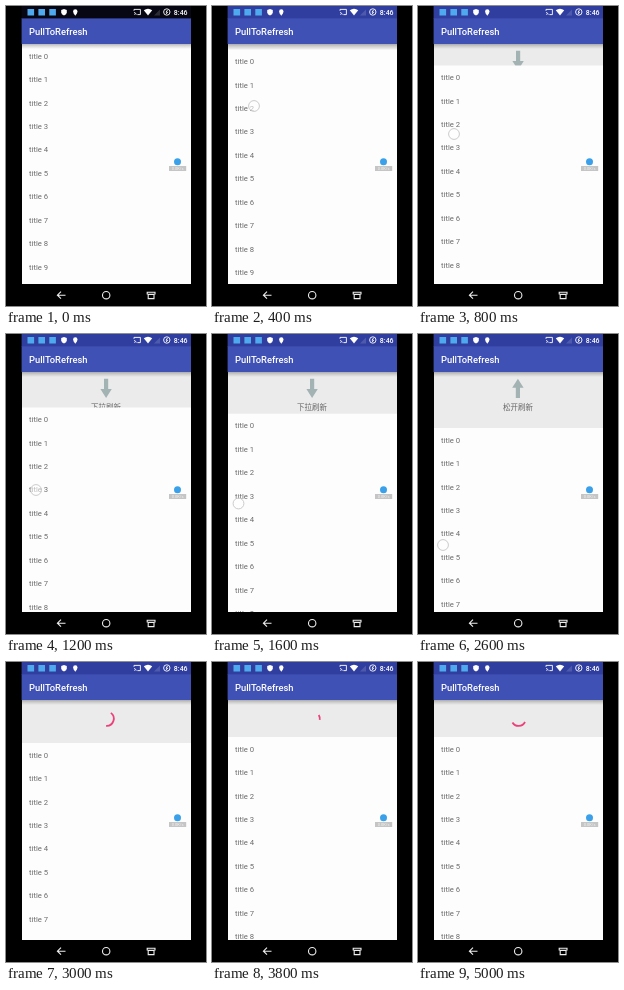
Animation, 200 px wide and 300 px high, one loop 5.2 s. Source, as an HTML page:

```html
<!DOCTYPE html>
<html lang="en">
<head>
<meta charset="utf-8">
<title>Pull to refresh</title>
<style>
  html, body { margin: 0; width: 100%; height: 100%; overflow: hidden; background: #000; }
  svg { display: block; width: 100vw; height: 100vh; }
  text { font-family: Roboto, sans-serif; }
  #rows text { font-size: 7.7px; fill: #6c6c6c; }
  #hint { font: 7.5px "Noto Sans CJK SC", "Noto Sans CJK", sans-serif; fill: #666; text-anchor: middle; }
</style>
</head>
<body>
<svg viewBox="0 0 200 300">
  <defs>
    <linearGradient id="shade" x2="0" y2="1">
      <stop offset="0" stop-color="#000" stop-opacity=".27"/>
      <stop offset=".4" stop-color="#000" stop-opacity=".14"/>
      <stop offset="1" stop-color="#000" stop-opacity="0"/>
    </linearGradient>
  </defs>

  <rect x="16" y="38" width="169" height="240" fill="#ebebeb"/>
  <g id="prompt">
    <path id="arrow" d="M98 44.7h4.2v10.3h3.6L100.1 64l-5.7-9h3.6z" fill="#a3b3b3"/>
    <text id="hint" x="100" y="76.2"></text>
  </g>
  <path id="spinner" fill="none" stroke="#ec407a" stroke-width="1.8"/>

  <g id="list">
    <rect x="16" y="38" width="169" height="260" fill="#fdfdfd"/>
    <g id="rows"></g>
  </g>

  <rect x="16" y="38" width="169" height="5" fill="url(#shade)"/>
  <rect x="15.6" y="12" width="169.4" height="26" fill="#3f51b5"/>
  <rect id="status" x="15.6" width="169.4" height="12.4"/>
  <text x="23" y="28.6" font-size="9.4" font-weight="500" fill="#fff">PullToRefresh</text>

  <!-- status bar -->
  <path d="M21.5 3h6.6v6.6h-6.6zM32.4 3h6.6v6.6h-6.6zM43.3 3h6.6v6.6h-6.6z" fill="#4fa9ee"/>
  <g fill="#fff">
    <path d="M58 3l2.8 1v2.2q0 2.1-2.8 3.4q-2.8-1.3-2.8-3.4V4z"/>
    <path d="M69.3 9.8q-2.2-2.8-2.2-4.4a2.2 2.2 0 0 1 4.4 0Q71.5 7 69.3 9.8z"/>
    <path d="M142 9.6l-4.2-5.3q4.2-3 8.4 0z"/>
    <path d="M148 9.5l6-6v6z" opacity=".15"/>
    <text x="167.8" y="8.8" font-size="7" font-weight="500">8:46</text>
  </g>
  <g fill="none" stroke="#fff" stroke-width=".9">
    <path d="M128 4.8V3.4h6.4v5.2h-3M128 6.5q2 .2 2.2 2.2M128 8.5h.6"/>
    <circle cx="160.8" cy="6" r="3.2"/>
    <path d="M161.5 4l-1.5 2.2h1.6L160.2 8"/>
  </g>

  <!-- navigation bar -->
  <rect y="278" width="200" height="22"/>
  <g fill="none" stroke="#eee" stroke-width="1.1">
    <path d="M59.5 289.2h-8M55 285.7l-3.6 3.5 3.6 3.5"/>
    <circle cx="100.2" cy="289.2" r="3.7"/>
    <path d="M142.2 288.4h5.8v4.2h-5.8zM141.2 288.4v-2.2h7.8v2.2"/>
  </g>

  <!-- floating badge -->
  <circle cx="171.5" cy="155.7" r="3.5" fill="#3aa0ea"/>
  <rect x="163" y="160" width="17.2" height="5" fill="#c5c5c5"/>
  <text x="171.7" y="164" font-size="4" fill="#f4f4f4" text-anchor="middle">0.0K/s</text>

  <circle id="touch" r="5.4" fill="#fff" fill-opacity=".55" stroke="#c6c6c6" stroke-width=".9"/>
</svg>

<script>
const LOOP = 5200, STEP = 200;
const RELEASE = 2800, ARMED = 1900;
const $ = id => document.getElementById(id);

// Tracks are [time, value] pairs joined by straight lines.
const pull = [[0, 0], [200, 1], [400, 5.5], [800, 21.5], [1200, 35.5], [2000, 48], [2600, 56], [2800, 56], [3000, 43], [3200, 37]];
const touchX = [[200, 43], [400, 42], [1200, 30], [2000, 23], [2600, 25]];
const touchY = [[200, 91], [400, 100], [1200, 156], [2000, 183], [2600, 211]];
const turn = [[1800, 0], [2000, 10], [2200, 180]];

function at(track, t) {
  const i = track.findIndex(([time]) => time > t);
  if (i === 0) return track[0][1];
  if (i < 0) return track[track.length - 1][1];
  const [t0, a] = track[i - 1], [t1, b] = track[i];
  return a + (b - a) * (t - t0) / (t1 - t0);
}

// cubic-bezier(.4, 0, .2, 1)
function ease(x) {
  if (x <= 0 || x >= 1) return Math.min(1, Math.max(0, x));
  let lo = 0, hi = 1;
  for (let i = 0; i < 20; i++) {
    const u = (lo + hi) / 2, v = 1 - u;
    if (1.2 * v * v * u + 0.6 * v * u * u + u ** 3 < x) lo = u; else hi = u;
  }
  return lo * lo * (3 - 2 * lo);
}

function arcPath(from, to) {
  const point = deg => {
    const a = deg * Math.PI / 180;
    return `${100.6 + 7.2 * Math.cos(a)} ${56.7 + 7.2 * Math.sin(a)}`;
  };
  return `M${point(from)}A7.2 7.2 0 ${to - from > 180 ? 1 : 0} 1 ${point(to)}`;
}

function spinnerPath(t) {
  const cycles = (t - 3800) / 1333 + 0.785;
  const count = Math.floor(cycles), phase = cycles - count;
  const base = 255 * cycles + 270 * count - 101;
  const tail = 270 * ease(phase * 2 - 1);
  const head = Math.max(270 * ease(phase * 2), tail + 6);
  return arcPath(base + tail, base + head);
}

function draw(t) {
  const loading = t >= RELEASE;
  $("status").setAttribute("fill", t < STEP ? "#060712" : "#303f9f");
  $("list").setAttribute("transform", `translate(0 ${at(pull, t)})`);
  $("prompt").style.display = loading ? "none" : "";
  $("spinner").style.display = loading ? "" : "none";
  $("arrow").setAttribute("transform", `rotate(${at(turn, t)} 100 54.4)`);
  $("hint").textContent = t < ARMED ? "下拉刷新" : "松开刷新";
  $("spinner").setAttribute("d", spinnerPath(t));
  $("touch").style.display = t >= STEP && !loading ? "" : "none";
  $("touch").setAttribute("transform", `translate(${at(touchX, t)} ${at(touchY, t)})`);
}

for (let i = 0; i < 11; i++) {
  const row = document.createElementNS("http://www.w3.org/2000/svg", "text");
  row.setAttribute("x", 23);
  row.setAttribute("y", 52.6 + 23.45 * i);
  row.textContent = "title " + i;
  $("rows").append(row);
}

const start = performance.now();
function tick() {
  const t = (performance.now() - start) % LOOP;
  draw(Math.floor(t / STEP) * STEP);
  requestAnimationFrame(tick);
}
tick();
</script>
</body>
</html>
```
